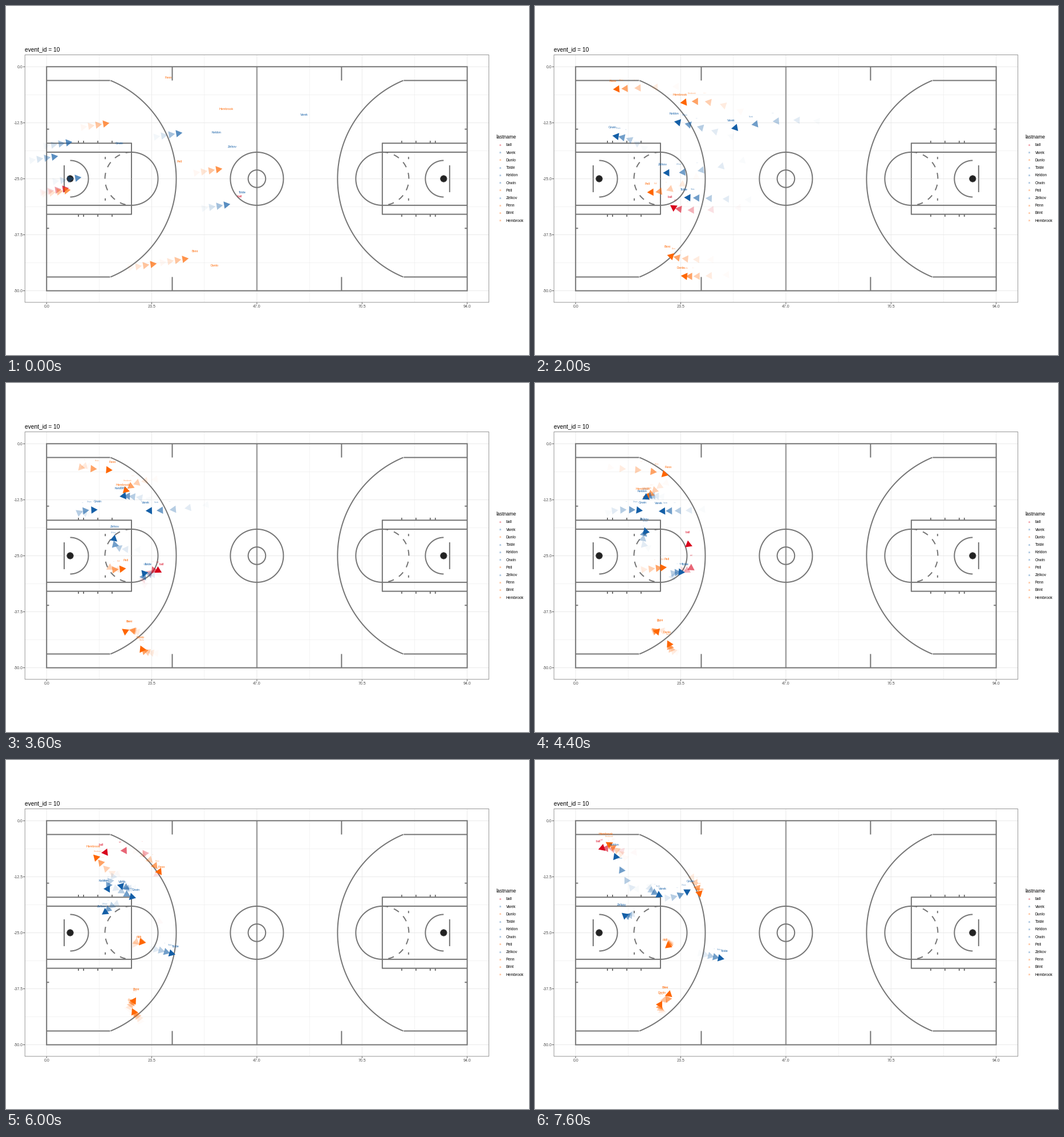
Write a matplotlib script that moves like this. It is 917x611 px and loops after 8 s.

```python
import numpy as np
import matplotlib.pyplot as plt
from matplotlib.animation import FuncAnimation
from matplotlib.patches import Circle, Polygon, Rectangle

plt.rcParams["font.family"] = "Liberation Sans"
plt.rcParams["path.snap"] = False

W, H, DPI = 917, 611, 100
PX = 72 / DPI
FRAMES, INTERVAL = 20, 400
ORANGE, BLUE, RED, LINE = "#ff6600", "#145fa7", "#d9001b", "#757575"
LEFT, TOP, FOOT = 71.2, 106.3, 7.845
MID_X, MID_Y = LEFT + 47 * FOOT, TOP + 25 * FOOT
ARROW, DROP = 7.4, 14.6


def smooth_path(keys, points):
    """Cubic Hermite curve through a few points, sampled at every frame."""
    keys, points = np.array(keys, float), np.array(points, float)
    slopes = np.gradient(points, keys, axis=0, edge_order=2)
    t = np.arange(FRAMES)
    i = np.clip(np.searchsorted(keys, t, side="right") - 1, 0, len(keys) - 2)
    span = (keys[i + 1] - keys[i])[:, None]
    u = (t - keys[i])[:, None] / span
    return ((1 + 2 * u) * (1 - u) ** 2 * points[i] + u * (1 - u) ** 2 * span * slopes[i]
            + u * u * (3 - 2 * u) * points[i + 1] + u * u * (u - 1) * span * slopes[i + 1])


tracks = {}


def run(name, color, *points, keys=(0, 2, 6, 11, 15, 19)):
    tracks[name] = color, smooth_path(keys, points)


# Each run: start, break, reaching the half court, then three set positions.
run("ball", RED, (410, 333), (237, 334), (258, 313), (274, 302), (268, 261),
    (264, 178), (167, 148), (111, 142), keys=(0, 5, 7, 10, 11, 12, 15, 19))
run("Fenn", ORANGE, (285, 125), (204, 128), (131, 133), (234, 147), (273, 187), (290, 226))
run("Hembrook", ORANGE, (386, 180), (324, 157), (237, 158), (189, 185), (153, 151), (124, 129))
run("Pell", ORANGE, (304, 272), (252, 301), (188, 312), (231, 308), (233, 310), (228, 315))
run("Brint", ORANGE, (331, 429), (277, 429), (223, 419), (219, 415), (228, 401), (228, 398))
run("Dunlo", ORANGE, (366, 454), (299, 458), (248, 456), (232, 436), (221, 420), (223, 407))
run("Varek", BLUE, (523, 190), (453, 185), (313, 205), (217, 210), (204, 213), (224, 225))
run("Keldon", BLUE, (369, 221), (309, 203), (228, 185), (188, 189), (171, 211), (139, 148))
run("Orwin", BLUE, (199, 240), (173, 222), (131, 211), (189, 209), (228, 227), (273, 212))
run("Zelkov", BLUE, (397, 246), (320, 268), (203, 276), (192, 238), (168, 256), (152, 253))
run("Tolde", BLUE, (414, 326), (329, 323), (250, 320), (263, 317), (297, 326), (332, 334))

# Last spots of the previous play, all drifting up the court.
DRIFT = np.array([13, -2])
LEFTOVERS = {
    RED: [(103, 320)],
    ORANGE: [(174, 206), (372, 286), (257, 452), (313, 443), (106, 323)],
    BLUE: [(302, 223), (109, 239), (84, 264), (125, 301), (386, 348)],
}
LEGEND = ["ball", "Varek", "Dunlo", "Tolde", "Keldon", "Orwin",
          "Pell", "Zelkov", "Fenn", "Brint", "Hembrook"]

fig = plt.figure(figsize=(W / DPI, H / DPI), dpi=DPI, facecolor="white")
ax = fig.add_axes([0, 0, 1, 1])
ax.set_xlim(0, W)
ax.set_ylim(H, 0)
ax.axis("off")


def line(x, y, color=LINE, width=2, z=2):
    ax.plot(x, y, color=color, lw=width * PX, zorder=z, solid_capstyle="butt")


def arc(cx, r, start, end, flip=False):
    a = np.radians(np.linspace(start, end, 90))
    x = cx + r * np.cos(a)
    line(2 * MID_X - x if flip else x, MID_Y + r * np.sin(a))


def box(x, y, width, height, color, stroke):
    ax.add_patch(Rectangle((x, y), width, height, fill=False, ec=color,
                           lw=stroke * PX, zorder=3))


def text(x, y, s, size, color="black", ha="left", alpha=1, z=6):
    return ax.text(x, y + 0.35 * size, s, fontsize=size * PX, color=color, ha=ha,
                   va="baseline", alpha=alpha, zorder=z)


def draw_axes():
    for i in range(9):
        width = 0.5 if i % 2 else 0.9
        x, y = LEFT + i * 11.75 * FOOT, TOP + i * 6.25 * FOOT
        line([x, x], [85.5, 519], "#e8e8e8", width, 0)
        line([33, 847], [y, y], "#e8e8e8", width, 0)
        if i % 2 == 0:
            line([x, x], [519, 522], "#333333", 0.8)
            line([30, 33], [y, y], "#333333", 0.8)
            text(x, 526, f"{i * 11.75:.1f}", 7, "#4d4d4d", "center")
            text(29.5, y, f"{0 - 6.25 * i:.1f}", 7, "#4d4d4d", "right")
    box(33.2, 85.5, 813.5, 433.3, "#8c8c8c", 0.9)
    text(33, 76, "event_id = 10", 10.1)


def draw_half(flip):
    def both(x0, dy0, x1, dy1):
        x = np.array([x0, x1])
        for sign in (-1, 1):
            line(2 * MID_X - x if flip else x, [MID_Y + sign * dy0, MID_Y + sign * dy1])

    both(LEFT, 172, 182.5, 172)
    both(291.5, 172, 291.5, 196)
    both(LEFT, 62.2, 220, 62.2)
    both(LEFT, 46.5, 220, 46.5)
    both(LEFT, 86.8, 75.5, 86.8)
    both(174, 34.3, 174, 38.3)
    both(220, 0, 220, 63)
    both(102, 0, 102, 23.5)
    for x in (127, 136, 161, 186):
        both(x, 62.2, x, 66.5)
    arc(112.5, 186, -67.6, 67.6, flip)
    arc(112.5, 32, -90, 90, flip)
    arc(220, 46.5, -90, 90, flip)
    dash = 180 / 14
    for k in range(7):
        start = 270 - 2 * k * dash
        arc(220, 46.5, start - dash, start, flip)
    hoop_x = 2 * MID_X - 112.5 if flip else 112.5
    ax.add_patch(Circle((hoop_x, MID_Y), 5.7, fc="#222222", ec="#444444",
                        lw=0.8 * PX, zorder=3))


def draw_legend():
    text(859, 228.5, "lastname", 8.7)
    for i, name in enumerate(LEGEND):
        y = 243 + 13.23 * i
        text(866, y, "a", 5.6, tracks[name][0], "center", 0.7)
        text(876.5, y, name, 6.8)


draw_axes()
box(LEFT, TOP, 94 * FOOT, 50 * FOOT, LINE, 2)
line([MID_X] * 2, [TOP, TOP + 50 * FOOT], "#9c9c9c", 2.4)
arc(MID_X, 46.5, 0, 360)
arc(MID_X, 15.3, 0, 360)
draw_half(False)
draw_half(True)
draw_legend()

moving = []


def fade(age):
    return max(0, 1 - age / 5) ** 2.3


def triangle(center, step, color, alpha):
    heading = np.arctan2(step[1], step[0]) + np.arange(3) * 2 * np.pi / 3
    corners = center + ARROW * np.column_stack([np.cos(heading), np.sin(heading)])
    moving.append(ax.add_patch(Polygon(corners, fc=color, lw=0, alpha=alpha, zorder=4)))


def draw_leftovers(frame):
    for color, spots in LEFTOVERS.items():
        for spot in spots:
            for back in range(3, -1, -1):
                alpha = fade(frame + back + 0.7)
                if alpha > 0.01:
                    triangle(spot - DRIFT * back, DRIFT, color, alpha)


def draw(frame):
    while moving:
        moving.pop().remove()
    draw_leftovers(frame)
    for age in range(min(frame, 4), -1, -1):
        at = frame - age
        for name, (color, path) in tracks.items():
            if at > 0:
                step = path[at] - path[at - 1]
                unit = step / max(np.hypot(*step), 1e-6)
                triangle(path[at] + (0, DROP) - ARROW * unit, step, color, fade(age))
            if age < 3:
                size = 5.4 * (1 - age / 2.5)
                moving.append(text(*path[at], name, size, color, "center", fade(age), 5))
    return moving


anim = FuncAnimation(fig, draw, frames=FRAMES, interval=INTERVAL, init_func=lambda: [],
                     repeat=True, repeat_delay=0, blit=False)
plt.show()
```
